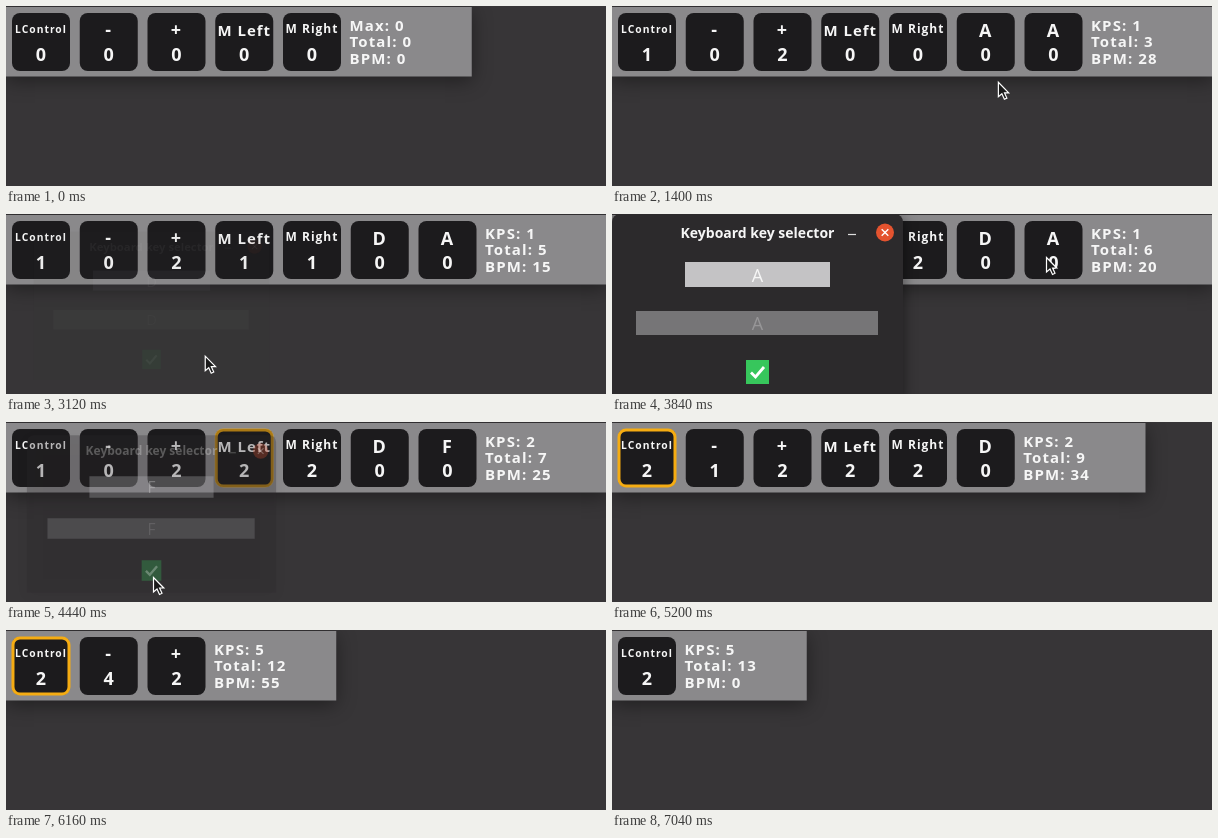
Recreate the animation shown at these times as an HTML page with a canvas. Size 600 px wide and 180 px high, loop 7.12 s.

```html
<!DOCTYPE html>
<html lang="en">
<head>
<meta charset="utf-8">
<title>Key counter</title>
<style>
  html, body { margin: 0; width: 100%; height: 100%; overflow: hidden; background: #373537; }
  canvas { display: block; width: 600px; height: 180px; }
</style>
</head>
<body>
<canvas width="600" height="180"></canvas>
<script>
const LOOP = 7120;
const FONT = '"Open Sans", "Noto Sans", sans-serif';
const PITCH = 67.75;
const ctx = document.querySelector('canvas').getContext('2d');

// Label, font size, baseline
const KEYS = [
  ['LControl', 10.3, 27], ['-', 18, 30], ['+', 18, 30],
  ['M Left', 15, 30], ['M Right', 12, 27], ['A', 18, 31], ['A', 18, 31]
];
const [CTRL, MINUS, PLUS, LEFT, RIGHT] = [0, 1, 2, 3, 4];
const GLOW_FADE = 120;

// Key, pressed at, released at
const PRESSES = [
  [CTRL, 200, 880], [PLUS, 400, 480], [PLUS, 640, 720],
  [RIGHT, 1760, 1880], [LEFT, 2900, 2980],
  [RIGHT, 3520, 3640], [LEFT, 4320, 4400],
  [CTRL, 4720, 6560],
  [MINUS, 4960, 5060], [MINUS, 5320, 5420], [MINUS, 5620, 5720],
  [MINUS, 5920, 6020], [MINUS, 6200, 6300], [MINUS, 6480, 6560]
];

// Time, KPS, BPM
const STATS = [
  [200, 1, 15], [400, 2, 30], [640, 3, 45], [1160, 1, 28], [1760, 1, 15],
  [3520, 1, 20], [4320, 2, 25], [4720, 1, 25], [4960, 2, 34], [5320, 3, 41],
  [5620, 4, 48], [5920, 5, 55], [6200, 5, 52], [6640, 5, 0]
];

const DIALOGS = [
  { open: 1880, typed: 2280, close: 2995, slot: 5, letter: 'D' },
  { open: 3600, typed: 3920, close: 4366, slot: 6, letter: 'F' }
];

// Time, x, y
const PATH = [
  [1080, 440, 135], [1400, 386, 76], [1560, 366, 43], [2440, 366, 43],
  [2840, 147, 155], [3000, 147, 155], [3120, 198, 142], [3440, 434, 43],
  [3900, 434, 43], [4260, 147, 155], [4560, 147, 155]
];

function text(str, x, y, size, { weight = 700, color = '#f6f6f6', align = 'center', gap = 0 } = {}) {
  ctx.font = `${weight} ${size}px ${FONT}`;
  ctx.letterSpacing = gap + 'px';
  ctx.textAlign = align;
  ctx.fillStyle = color;
  ctx.fillText(str, x, y);
}

function box(x, y, w, h, color, radius = 0) {
  ctx.beginPath();
  ctx.roundRect(x, y, w, h, radius);
  ctx.fillStyle = color;
  ctx.fill();
}

function line(points, color, width) {
  ctx.beginPath();
  points.forEach(([x, y]) => ctx.lineTo(x, y));
  ctx.strokeStyle = color;
  ctx.lineWidth = width;
  ctx.stroke();
}

function shadowed(blur, dy, alpha, draw) {
  ctx.save();
  ctx.shadowColor = `rgba(0,0,0,${alpha})`;
  ctx.shadowBlur = blur;
  ctx.shadowOffsetY = dy;
  draw();
  ctx.restore();
}

function glow(key, t) {
  const press = PRESSES.findLast(([k, from]) => k === key && from <= t);
  return press ? Math.min(1, Math.max(0, 1 - (t - press[2]) / GLOW_FADE)) : 0;
}

function drawKey(i, t, count) {
  const x = 6 + i * PITCH;
  const [name, size, base] = KEYS[i];
  const renamed = DIALOGS.find(d => d.slot === i && t >= d.close - 40);
  box(x, 7, 58, 58, '#1c1b1d', 8);
  ctx.save();
  ctx.globalAlpha = glow(i, t);
  ctx.beginPath();
  ctx.roundRect(x + 1, 8, 56, 56, 7);
  ctx.strokeStyle = '#f5ac12';
  ctx.lineWidth = 3;
  ctx.stroke();
  ctx.restore();
  text(renamed ? renamed.letter : name, x + 29, base, size, { gap: 1 });
  text(count, x + 29, 55, 18);
}

function drawPanel(t) {
  const done = PRESSES.filter(p => p[1] <= t);
  const count = key => done.filter(p => p[0] === key).length;
  const shown = 5 + count(PLUS) - count(MINUS);
  shadowed(18, 4, 0.4, () => box(0, 1, 127 + shown * PITCH, 69.5, '#8a898b'));
  for (let i = 0; i < shown; i++) drawKey(i, t, count(i));

  const [, kps, bpm] = STATS.findLast(s => s[0] <= t) || [0, 0, 0];
  // The press that removes the minus key is not counted.
  const total = Math.min(done.length, 13);
  const rows = [`${done.length ? 'KPS' : 'Max'}: ${kps}`, `Total: ${total}`, `BPM: ${bpm}`];
  rows.forEach((row, i) =>
    text(row, 4.8 + shown * PITCH, 25 + i * 16.4, 15, { align: 'left', gap: 1.1 }));
}

function drawDialog(d, t) {
  const fadeIn = Math.min(1, (t - d.open) / 160);
  const fadeOut = Math.min(1, Math.max(0, (t - d.close) / 160));
  const alpha = (1 - (1 - fadeIn) ** 2) * (1 - fadeOut) ** 2;
  const scale = 0.8 + 0.2 * alpha;
  const typed = t >= d.typed;
  const letter = typed ? d.letter : 'A';

  ctx.save();
  ctx.globalAlpha = alpha;
  ctx.translate(145.5, 92);
  ctx.scale(scale, scale);
  ctx.translate(-145.5, -92);
  shadowed(14, 3, 0.5 * alpha, () => box(0, 0, 291, 184, '#2c2a2c', [8, 8, 0, 0]));
  text('Keyboard key selector', 145.5, 23.5, 14);
  line([[236, 20.5], [244, 20.5]], '#dddddd', 1.2);
  box(264, 9.5, 18, 18, '#e4532f', 9);
  line([[269.7, 15.2], [276.3, 21.8]], '#ffffff', 1.4);
  line([[276.3, 15.2], [269.7, 21.8]], '#ffffff', 1.4);
  box(73, 48, 145, 25, '#c4c3c5');
  text(letter, 145.5, 68, 18, { weight: 400 });
  box(24, 97, 242, 24, typed ? '#939294' : '#767577');
  text(letter, 145.5, 116, 18, { weight: 400, color: '#979698' });
  box(134, 146, 23, 24, '#37c65c');
  line([[139, 158.5], [143.5, 163], [152, 153]], '#ffffff', 2.8);
  ctx.restore();
}

function drawCursor(t) {
  const i = PATH.findIndex(p => p[0] > t);
  if (i < 1) return;
  const [t0, x0, y0] = PATH[i - 1];
  const [t1, x1, y1] = PATH[i];
  const k = (t - t0) / (t1 - t0);
  ctx.save();
  ctx.translate(x0 + (x1 - x0) * k, y0 + (y1 - y0) * k);
  const arrow = new Path2D('M.5 .5V15L4 12L6.5 17.5L9 16.3L6.6 11H10.8Z');
  ctx.fillStyle = '#1b1b1b';
  ctx.fill(arrow);
  ctx.strokeStyle = '#ffffff';
  ctx.lineWidth = 1.2;
  ctx.stroke(arrow);
  ctx.restore();
}

const start = performance.now();

function frame() {
  const t = (performance.now() - start) % LOOP;
  ctx.fillStyle = '#373537';
  ctx.fillRect(0, 0, 600, 180);
  drawPanel(t);
  DIALOGS.filter(d => t >= d.open && t < d.close + 160).forEach(d => drawDialog(d, t));
  drawCursor(t);
  requestAnimationFrame(frame);
}
frame();
</script>
</body>
</html>
```
